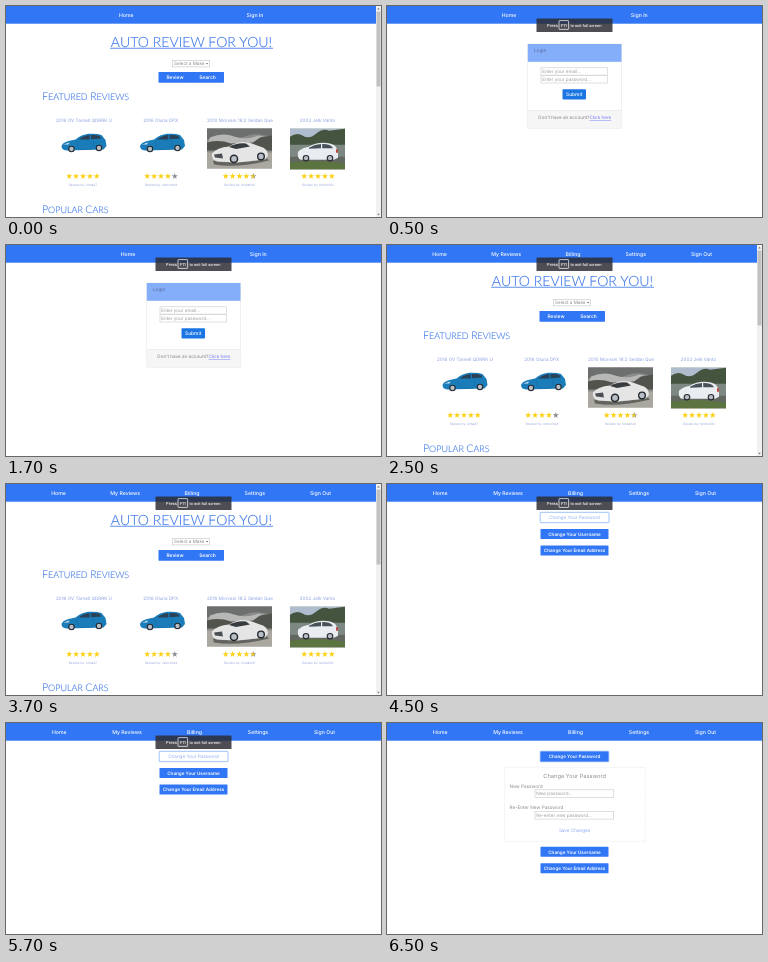
An HTML page that plays this animation: 375 px wide and 211 px high, repeating every 8000 ms.

```html
<!DOCTYPE html>
<html lang="en">
<head>
<meta charset="utf-8">
<title>Auto reviews</title>
<style>
html, body { margin: 0; width: 100%; height: 100%; overflow: hidden; background: #fff; }
svg { display: block; width: 100%; height: 100%; }
text { font-family: Inter, "Open Sans", sans-serif; text-rendering: geometricPrecision; }
.thin { font-family: Lato, sans-serif; font-weight: 300; }
</style>
</head>
<body>
<svg id="stage" viewBox="0 0 375 211" preserveAspectRatio="none"></svg>
<script>
const BLUE = '#3076f5', INK = '#3a76ea', GREY = '#8c8c8c';

const rect = (x, y, w, h, fill, more = '') =>
  `<rect x="${x}" y="${y}" width="${w}" height="${h}" fill="${fill}" ${more}/>`;
const path = (d, fill, more = '') => `<path d="${d}" fill="${fill}" ${more}/>`;
const disc = (x, y, r, fill) => `<circle cx="${x}" cy="${y}" r="${r}" fill="${fill}"/>`;
const text = (s, x, y, size, fill, more = '') =>
  `<text x="${x}" y="${y}" font-size="${size}" fill="${fill}" ${more}>${s}</text>`;
const mid = (s, x, y, size, fill, more = '') =>
  text(s, x, y, size, fill, 'text-anchor="middle" ' + more);

const nav = (items, width = 375) => rect(0, 0, width, 17.7, BLUE) +
  items.map(([s, x]) => mid(s, x, 11, 5.2, '#fff', 'font-weight="500"')).join('');

const button = (s, x, y, w, h = 10, size = 4.6) =>
  rect(x, y, w, h, BLUE, 'rx=".6"') +
  mid(s, x + w / 2, y + h / 2 + 1.7, size, '#fff', 'font-weight="600"');

const input = (s, x, y, w, h) =>
  rect(x, y, w, h, '#fff', 'stroke="#cacaca" stroke-width=".6"') +
  text(s, x + 1.2, y + h / 2 + 1.6, 4.6, '#9c9c9c');

const hint = () => rect(149.5, 12.5, 76, 13.5, '#2b2c33', 'opacity=".84" rx=".5"') +
  text('Press', 160, 20.9, 4.1, '#fff', 'font-weight="500"') +
  rect(172, 14.6, 9.6, 8.8, 'none', 'stroke="#fff" stroke-width=".7" rx=".6"') +
  mid('F11', 176.8, 20.8, 4.1, '#fff', 'font-weight="500"') +
  text('to exit full screen', 183.4, 20.9, 3.8, '#fff', 'font-weight="500"');

// Large first letters, smaller capitals after them
const heading = (s, y) => {
  const words = s.toUpperCase().split(' ').map(w =>
    `<tspan font-size="10.5">${w[0]}</tspan>${w.slice(1)}`);
  return text(words.join(' '), 36, y, 9, INK, `class="thin" stroke="${INK}" stroke-width=".1"`);
};

const star = (x, y, r) => 'M' + Array.from({ length: 10 }, (_, i) => {
  const a = i * Math.PI / 5 - Math.PI / 2, k = i % 2 ? r * 0.4 : r;
  return (x + k * Math.cos(a)).toFixed(2) + ' ' + (y + k * Math.sin(a)).toFixed(2);
}).join('L') + 'Z';

const stars = (cx, score) => [0, 1, 2, 3, 4].map(i => {
  const x = cx + (i - 2) * 6.9, d = star(x, 170.3, 3.2);
  if (score >= i + 1) return path(d, '#fbd011');
  const half = score > i ? path(star(x - 0.5, 170.3, 2.4), '#fbd011') : '';
  return path(d, '#8a8d92') + half;
}).join('');

const wheel = (x, y, r) => disc(x, y, r, '#252a30') + disc(x, y, r * 0.65, '#b9c0c7');

const hatchback = x => `<g transform="translate(${x} 126)">` +
  path('M1 14Q2 10.5 8 9L15 7.6Q21 2.6 28 1.8Q36 1.2 41 3L45 8L46 14L43 17.5L6 18.5Q1 18 1 14Z', '#1a7dba') +
  path('M18 7.6Q23 3.6 29 3.1L29.5 7.4Z M30.2 3Q36 2.6 39 3.8L41 6.6L30.7 7.3Z', '#2b4256') +
  path('M3 12.4L9 10.4L8 12.4Z', '#d5e6f0') +
  path('M16 9Q17 16 19 17.4H31Q34 14 33 8', 'none', 'stroke="#10659c" stroke-width=".4"') +
  wheel(11, 17, 3.3) + wheel(38.5, 16, 3.3) + '</g>';

const roadster = () => '<g transform="translate(201 122.4)">' +
  rect(0, 0, 65, 40, '#8b8c8a') +
  path('M0 0H65V9Q50 3 38 8T14 7L0 11Z', '#6d6f6f') +
  path('M3 9Q16 4 27 8T52 7L65 11V17H0Z', '#b7b8b6') +
  path('M0 14Q12 11 24 15L46 14L53 9L65 7V22H0Z', '#51534d') +
  path('M0 24H65V40H0Z', '#a9a7a0') +
  path('M6 32Q28 37 60 30L62 32Q30 40 7 36Z', '#63635f') +
  path('M5 25Q10 19 22 18Q31 12 42 14L53 18Q61 20 61 27L58 31L30 34L10 33Q4 31 5 25Z', '#e4e5e4') +
  path('M22 18.5Q30 14 39 15L43 18L29 20.5Z', '#393c3f') +
  path('M7 26L15 25L16 30L8 29Z', '#4c5054') +
  wheel(27, 30.5, 4.3) + wheel(54, 28, 4) + '</g>';

const wagon = () => '<g transform="translate(284 122.7)">' +
  rect(0, 0, 55, 40.5, '#6f7d6b') + rect(0, 0, 55, 10, '#aebccd') +
  path('M0 8Q7 3 13 7T26 5T39 2L55 0V22H0Z', '#45543f') +
  path('M0 16H55V30H0Z', '#7e8882') +
  path('M0 28H55V40.5H0Z', '#62675f') + path('M0 34Q25 30 55 35V40.5H0Z', '#5c7440') +
  path('M8 23Q12 19 19 18Q25 14 33 14Q41 14 45 17L48 22V29L44 31H11Q7 30 8 23Z', '#e9edf2') +
  path('M19 19Q25 15.5 31 15.3V19.5L19 20Z M32.2 15.3Q39 15 42 18L43 19.5H32.2Z', '#46515a') +
  path('M46 20.5H48V24H46Z', '#b44a42') +
  wheel(16, 29.5, 3.3) + wheel(40, 29.5, 3.3) + '</g>';

const cards = [
  [78, 77, '2016 OV Tarnell QDRRK U', 'olma47', 5, hatchback(54.5)],
  [154.7, 155, '2016 Oluna DPX', 'vetorshed', 4, hatchback(133)],
  [234, 233.5, '2010 Morvani 18:2 Seldan Que', 'miraknoll', 4.5, roadster()],
  [311.5, 312, '2002 Jelk Vanto', 'tembo31x', 5, wagon()],
];

const home = items => nav(items, 370) +
  rect(370, 0, 5, 211, '#f1f1f1') + rect(370.5, 5.5, 4, 75, '#c1c1c1') +
  path('M371.2 3.5L372.5 1.8L373.8 3.5Z M371.2 207.8L372.5 209.5L373.8 207.8Z', '#777') +
  mid('AUTO REVIEW FOR YOU!', 185.5, 40.5, 14.1, INK, `class="thin" stroke="${INK}" stroke-width=".12"`) +
  rect(104, 41.8, 163, 0.8, INK) +
  rect(166.5, 54.3, 37, 6.6, '#fff', 'stroke="#c4c4c4" stroke-width=".6"') +
  text('Select a Make', 168, 59.2, 4.6, '#8a8a8a') +
  path('M200 57H202.2L201.1 58.5Z', '#666') +
  button('Review', 152.5, 66, 33, 10.7, 4.9) + button('Search', 185, 66, 33, 10.7, 4.9) +
  heading('Featured Reviews', 94.3) +
  cards.map(([tx, cx, name, user, score, art]) =>
    mid(name, tx, 116, 4.6, '#8a9fe2') + art + stars(cx, score) +
    mid('Review by: ' + user, cx, 179.7, 3.2, '#97a5dc')).join('') +
  heading('Popular Cars', 207);

const login = nav([['Home', 122], ['Sign In', 252.3]]) + hint() +
  rect(140.8, 38, 93.7, 84.5, '#fff', 'stroke="#e6e6e6" stroke-width=".6"') +
  rect(140.8, 38, 93.7, 17.8, '#84adfa') +
  text('Login', 146.8, 46, 4.8, '#5c6f98') +
  input('Enter your email...', 154, 61.8, 66.5, 7.3) +
  input('Enter your password...', 154, 69.7, 66.5, 7.3) +
  rect(175.5, 83.2, 23.5, 10.3, '#1b76e3', 'rx="1"') +
  mid('Submit', 187.2, 90.1, 4.9, '#fff', 'font-weight="500"') +
  rect(141, 104, 93.3, 18.3, '#f6f6f6') + rect(141, 104, 93.3, 0.5, '#e2e2e2') +
  mid('Don\'t have an account?<tspan fill="#6f78f5" text-decoration="underline">Click here</tspan>',
    187.8, 113, 4.6, '#808080');

const member = [['Home', 53.3], ['My Reviews', 121], ['Billing', 188.5], ['Settings', 252], ['Sign Out', 318.5]];
const memberHome = [['Home', 52.5], ['My Reviews', 119.2], ['Billing', 186], ['Settings', 248.8], ['Sign Out', 314.5]];

const accountButtons = y =>
  button('Change Your Username', 153.5, y, 68) +
  button('Change Your Email Address', 153.5, y + 16.5, 68);

const settings = nav(member) + hint() +
  rect(153.2, 28.3, 68.8, 10.4, '#fff', 'stroke="#86b4f8" stroke-width=".8" rx=".8"') +
  mid('Change Your Password', 187.6, 35.2, 4.6, '#8faef3') +
  accountButtons(45);

const password = nav(member) +
  rect(152.7, 27.7, 69.6, 11.6, '#a9c8fc', 'rx="1.2"') +
  button('Change Your Password', 153.5, 28.5, 68) +
  rect(117.6, 44.3, 140.6, 74, '#fff', 'stroke="#e2e2e2" stroke-width=".6" stroke-dasharray="2 1"') +
  mid('Change Your Password', 187.7, 55.3, 5.7, '#8f8f8f') +
  text('New Password', 122.6, 64.6, 4.7, GREY) +
  input('New password...', 148, 66.8, 78.7, 7.8) +
  text('Re-Enter New Password', 122.6, 86, 4.7, GREY) +
  input('Re-enter new password...', 148, 88.3, 78.7, 7.8) +
  mid('Save Changes', 187.5, 109, 4.6, '#86a5f6') +
  accountButtons(123.8);

const scenes = [
  [0, home([['Home', 120.3], ['Sign In', 249]])],
  [500, login],
  [2500, home(memberHome) + hint()],
  [4500, settings],
  [6500, password],
];

const stage = document.getElementById('stage');
stage.innerHTML = scenes.map(([, art]) => `<g display="none">${art}</g>`).join('');
const layers = [...stage.children];

const draw = () => {
  const t = performance.now() % 8000;
  const now = scenes.filter(([start]) => start <= t).length - 1;
  layers.forEach((g, i) => g.setAttribute('display', i === now ? 'inline' : 'none'));
  requestAnimationFrame(draw);
};
draw();
</script>
</body>
</html>
```
